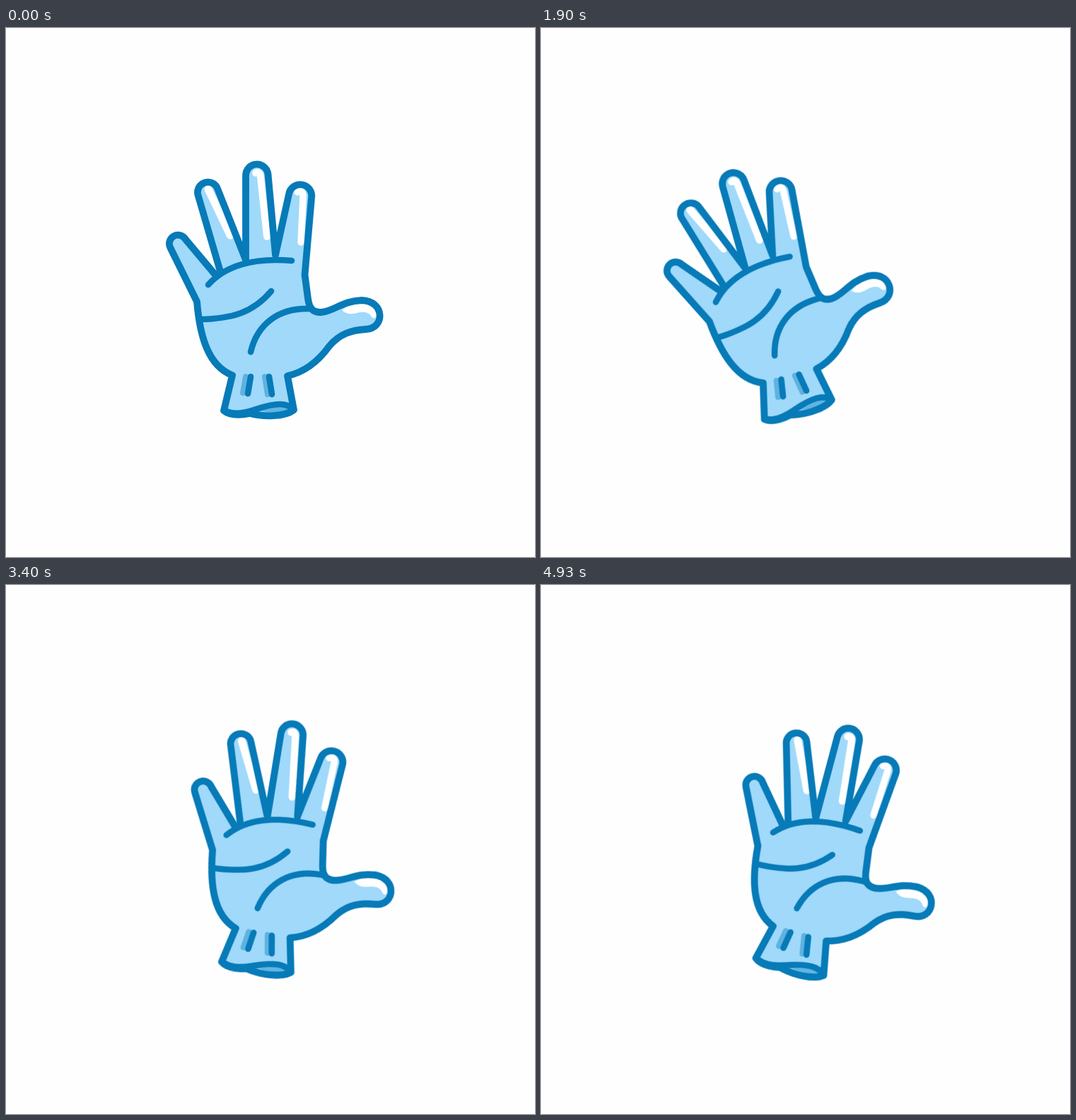
These frames come from a looping animation (748 by 748 pixels, 5010 ms). An HTML page:

```html
<!DOCTYPE html>
<html lang="en">
<head>
<meta charset="utf-8">
<title>Waving hand</title>
<style>
  html, body { margin: 0; width: 100%; height: 100%; overflow: hidden; background: #fefefe; }
  svg { display: block; width: 100vw; height: 100vh; }
  #hand { transform-origin: 358px 517px; }
  .skin { fill: #a0d9fa; }
  .line { fill: none; stroke: #077ab8; stroke-width: 8.6; stroke-linecap: round; stroke-linejoin: round; }
  .outline { stroke-width: 9.8; }
  .shine { fill: none; stroke: #fff; stroke-linecap: round; stroke-linejoin: round; }
  .fold { fill: none; stroke: #5fb2df; stroke-width: 8; stroke-linecap: round; }
</style>
</head>
<body>
<svg viewBox="0 0 748 748">
  <g transform="translate(-1 1)">
  <g id="hand">
    <!-- palm, fingers and wrist -->
    <path class="skin" d="M271 386 L233.5 310 A12.2 12.2 0 0 1 255 298 L297 348
      L303 340 L273 237 A14.3 14.3 0 0 1 300 226 L340 327
      L340 208 A15.8 15.8 0 0 1 371.6 207 L382 320
      L401 234 A16 16 0 0 1 433 239 L423.5 348 L428 382
      C430 396 435 401 446 401 C465 400 475 385 504 384
      C537 385 537 424 510 425 C489 426 472 432 458 449
      C445 467 425 485 399 491 L408 539 C395 549 365 549 346 544
      C330 547 316 546 309 540 L321 490 C287 477 275 435 271 386 Z"/>
    <path fill="#62b5e2" d="M360 540 C372 533 392 532 404 537 C394 544 374 545 360 540 Z"/>

    <!-- shine -->
    <path class="shine" stroke-width="11" d="M287 227 L318 292"/>
    <path class="shine" stroke-width="10" d="M354 204 Q360 201 361 210 L370 294"/>
    <path class="shine" stroke-width="9.5" d="M413 231 Q421 227 421 237 L418 302"/>
    <path fill="#fff" d="M476 398 C485 391 495 388 507 388 C519 389 527 397 525 405
      C524 411 519 410 517 406 C513 400 505 400 497 402 C490 404 482 404 476 398 Z"/>

    <!-- wrist folds -->
    <path class="fold" d="M340 492 L336 515 M367 492 L371 517"/>
    <path class="line" d="M347 492 L343 516 M373 492 L377 517"/>

    <!-- outline -->
    <path class="line outline" d="M271 386 L233.5 310 A12.2 12.2 0 0 1 255 298 L297 348
      M303 340 L273 237 A14.3 14.3 0 0 1 300 226 L340 327
      M340 327 L340 208 A15.8 15.8 0 0 1 371.6 207 L382 320
      L401 234 A16 16 0 0 1 433 239 L423.5 348 L428 382
      C430 396 435 401 446 401 C465 400 475 385 504 384
      C537 385 537 424 510 425 C489 426 472 432 458 449
      C445 467 425 485 399 491 L408 539 C395 549 365 549 346 544
      C330 547 316 546 309 540 L321 490 C287 477 275 435 271 386"/>
    <path class="line" d="M309 540 C340 552 358 531 388 531 Q401 531 408 539"/>

    <!-- palm creases -->
    <path class="line" d="M287 362 C310 336 350 323 405 328
      M275 411 C320 410 350 402 376 371
      M347 457 C356 419 385 394 432 396"/>
  </g>
  </g>
</svg>
<script>
  const LOOP = 5010;
  const STEP = 200;
  const WAVE = [9.2, 14.9, -9.8, -15.5];
  const TWO_WAVES = [...WAVE, ...WAVE, 0];

  const wave = (start, angles) =>
    angles.map((angle, i) => ({ at: start + i * STEP, angle }));

  const poses = [
    { at: 0, angle: 0 },
    ...wave(500, TWO_WAVES),
    ...wave(2600, TWO_WAVES),
    ...wave(4700, WAVE.slice(0, 2)),
    { at: LOOP, angle: 0 },
  ];

  document.getElementById("hand").animate(
    poses.map(({ at, angle }) => ({
      offset: at / LOOP,
      transform: `rotate(${angle}deg)`,
      easing: "step-end",
    })),
    { duration: LOOP, iterations: Infinity }
  );
</script>
</body>
</html>
```
